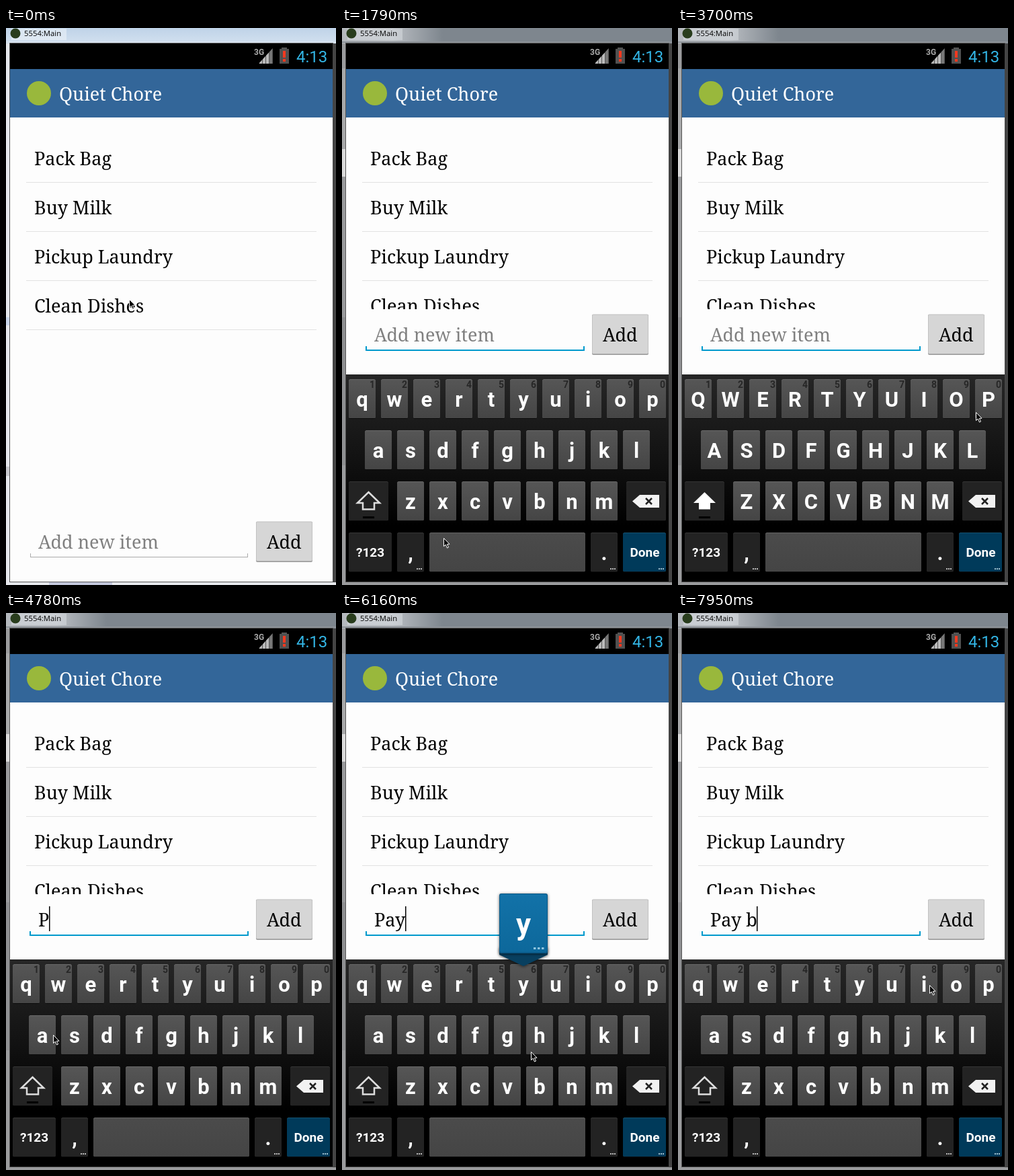
An HTML page with a canvas that plays this animation: 491x828 px, repeating every 8000 ms.

```html
<!DOCTYPE html>
<html lang="en">
<head>
<meta charset="utf-8">
<title>Task list</title>
<style>
html, body { margin: 0; width: 100%; height: 100%; overflow: hidden; background: #fff; }
canvas { display: block; width: 491px; height: 828px; }
</style>
</head>
<body>
<canvas id="stage"></canvas>
<script>
const LOOP = 8000, W = 491, H = 828;
const SERIF = '27px "Noto Serif", serif';
const canvas = document.getElementById('stage');
const dpr = window.devicePixelRatio || 1;
canvas.width = W * dpr;
canvas.height = H * dpr;
const c = canvas.getContext('2d');
c.scale(dpr, dpr);

// Moments of change, in ms
const ACTIVE = 930, FOCUS = 1210, KEYBOARD = 1640, SHIFT_ON = 3280, SHIFT_OFF = 4410;
const typed = [[4410, 'P'], [5240, 'Pa'], [6160, 'Pay'], [6850, 'Pay '], [7530, 'Pay b']];
const blinks = [FOCUS, 2200, 4410, 5240, 6160, 6850, 7530];
// start, end, letter, key centre, row top, has more dots
const popups = [
  [4410, 4540, 'P', 447, 522, true],
  [5240, 5500, 'a', 54, 598, true],
  [6160, 6300, 'y', 270, 522, true],
  [7530, 7660, 'b', 294, 674, false]
];
// Pointer way points: time, x, y
const path = [
  [20, 183, 403], [670, 151, 758], [2100, 151, 758], [2620, 39, 702], [2750, 39, 702],
  [3140, 300, 640], [3660, 443, 571], [3790, 443, 571], [4050, 460, 556], [4310, 460, 556],
  [4700, 70, 627], [4960, 60, 627], [5090, 60, 627], [5350, 150, 586], [5740, 262, 553],
  [5870, 262, 553], [6130, 281, 652], [6260, 281, 652], [6520, 306, 768], [6780, 306, 768],
  [7170, 297, 712], [7300, 297, 712], [7820, 374, 553]
];

function rect(x, y, w, h, fill) {
  c.fillStyle = fill;
  c.fillRect(x, y, w, h);
}

function round(x, y, w, h, r, fill) {
  c.beginPath();
  c.roundRect(x, y, w, h, r);
  c.fillStyle = fill;
  c.fill();
}

function disc(x, y, r, fill) {
  c.beginPath();
  c.arc(x, y, r, 0, Math.PI * 2);
  c.fillStyle = fill;
  c.fill();
}

function poly(fill, ...p) {
  c.beginPath();
  for (let i = 0; i < p.length; i += 2) c.lineTo(p[i], p[i + 1]);
  c.closePath();
  if (fill) {
    c.fillStyle = fill;
    c.fill();
  }
}

function text(s, x, y, font, fill, align = 'left') {
  c.font = font;
  c.fillStyle = fill;
  c.textAlign = align;
  c.fillText(s, x, y);
}

const bold = size => `bold ${size}px Roboto, sans-serif`;

function fade(x0, y0, x1, y1, ...colors) {
  const g = c.createLinearGradient(x0, y0, x1, y1);
  colors.forEach((col, i) => g.addColorStop(i / (colors.length - 1), col));
  return g;
}

function dots(x, y, fill = '#bbb') {
  for (let i = 0; i < 3; i++) rect(x + i * 3, y, 2, 2, fill);
}

function drawWindow(active) {
  rect(0, 0, W, H, active ? '#9a9b9d' : '#e6e8ec');
  rect(0, 0, W, 23, active
    ? fade(0, 0, 150, 0, '#b4b8bd', '#b9bdc2', '#7e868e')
    : fade(0, 0, 0, 23, '#bfd3e8', '#d2e0ef'));
  rect(8, 1, 82, 17, active ? 'rgba(225,228,232,.45)' : 'rgba(238,244,250,.55)');
  rect(0, 20, W, 2, active ? '#8d9298' : '#d9e4ef');
  if (active) {
    rect(0, 60, 5, 120, '#a8a9aa');
    rect(0, 180, 5, 41, '#dcdcdc');
    rect(0, 430, 5, 220, '#8f9092');
  } else {
    rect(0, 430, 5, 12, '#c9d6ea');
    rect(0, 652, 5, 14, '#c8c9ce');
    rect(64, 824, 94, 4, '#c3c7dc');
  }
  disc(14, 8, 7.5, '#293d1d');
  text('5554:Main', 27, 12, '11.3px "Open Sans", sans-serif', '#000');
  rect(5, 22, 482, 802, '#555');
  rect(486, 23, 5, 801, '#444');
  rect(6, 23, 480, 800, '#fdfdfd');
}

function drawHeader() {
  rect(6, 23, 480, 38, '#000');
  text('3G', 369, 39.5, bold(12), '#aaa');
  poly('#555', 376, 53, 397, 53, 397, 30);
  c.save();
  c.clip();
  for (let i = 0; i < 4; i++) rect(377 + i * 5, 29, 4, 24, i < 3 ? '#bbb' : '#777');
  c.restore();
  rect(410, 29, 8, 3, '#555');
  rect(407, 31, 14, 22, '#505050');
  rect(412, 34, 4, 10, '#f4391f');
  rect(412, 46, 4, 4, '#f4391f');
  text('4:13', 432, 51, '24px Roboto, sans-serif', '#33b5e5');
  rect(6, 61, 480, 72, '#336699');
  disc(49, 97, 18, '#99b83c');
  text('Quiet Chore', 79, 108, SERIF, '#fff');
}

function drawList(bottom) {
  c.save();
  c.beginPath();
  c.rect(6, 133, 480, bottom - 133);
  c.clip();
  ['Pack Bag', 'Buy Milk', 'Pickup Laundry', 'Clean Dishes'].forEach((item, i) => {
    text(item, 42, 204 + i * 73, SERIF, '#000');
    rect(30, 229 + i * 73, 432, 1, '#e2e2e2');
  });
  c.restore();
}

function drawForm(t) {
  c.save();
  if (t >= KEYBOARD) c.translate(0, -308);
  const focused = t >= FOCUS;
  const value = typed.reduce((s, [at, v]) => t >= at ? v : s, '');
  text(value || 'Add new item', 48, 774, SERIF, value ? '#000' : '#808080');
  if (focused) {
    rect(35, 786, 326, 2, '#0099cc');
    rect(35, 781, 2, 6, '#0099cc');
    rect(359, 781, 2, 6, '#0099cc');
    const since = t - blinks.filter(b => b <= t).pop();
    if (since % 1000 < 500) {
      c.font = SERIF;
      rect(Math.round(47.5 + c.measureText(value).width), 744, 1.5, 37, '#000');
    }
  } else {
    rect(36, 786, 324, 1, '#aaa');
    rect(36, 781, 1, 6, '#aaa');
    rect(359, 781, 1, 6, '#aaa');
  }
  round(372, 734, 84, 60, 2, '#9c9c9c');
  round(372, 733.5, 84, 59, 2, '#c2c2c2');
  round(373, 734.5, 82, 57.5, 1, '#d6d6d6');
  text('Add', 388, 774, SERIF, '#000');
  c.restore();
}

function key(x, y, w, top, base) {
  round(x, y, w, 59, 2.5, '#0a0a0a');
  round(x, y, w, 58, 2.5, top);
  round(x, y + 1, w, 57, 2.5, base);
}

function letterRow(letters, x0, y, upper, hints) {
  [...letters].forEach((ch, i) => {
    const x = x0 + i * 48;
    key(x, y, 40, '#686868', fade(0, y, 0, y + 58, '#565656', '#454545'));
    if (hints) text((i + 1) % 10, x + 35, y + 13, bold(14), '#272727', 'center');
    text(upper ? ch.toUpperCase() : ch, x + 20, y + 41, bold(31), '#fff', 'center');
  });
}

function darkKey(x, y, w) {
  key(x, y, w, '#363636', '#232323');
}

function drawKeyboard(upper) {
  rect(6, 515, 480, 308, fade(0, 515, 0, 740, '#262626', '#141414', '#000'));
  letterRow('qwertyuiop', 10, 522, upper, true);
  letterRow('asdfghjkl', 34, 598, upper);
  letterRow('zxcvbnm', 82, 674, upper);

  darkKey(10, 674, 59);
  poly(upper ? '#fff' : null, 39.5, 690, 56, 706, 48, 706, 48, 715.5, 31, 715.5, 31, 706, 23, 706);
  if (!upper) {
    c.strokeStyle = '#ddd';
    c.lineWidth = 2.5;
    c.stroke();
  }
  rect(31, 726, 17, 3, '#000');

  darkKey(423, 674, 59);
  poly('#f2f2f2', 432, 703.5, 443, 694, 472, 694, 472, 713, 443, 713);
  c.strokeStyle = '#222';
  c.lineWidth = 2.5;
  c.beginPath();
  c.moveTo(452, 699);
  c.lineTo(461, 708);
  c.moveTo(461, 699);
  c.lineTo(452, 708);
  c.stroke();

  darkKey(10, 750, 64);
  text('?123', 42, 786, bold(19), '#fff', 'center');
  darkKey(82, 750, 40);
  text(',', 102, 791, bold(31), '#fff', 'center');
  dots(111, 803);
  key(130, 750, 232, '#636363', fade(0, 750, 0, 808, '#4b4b4b', '#454545'));
  darkKey(370, 750, 40);
  text('.', 390, 791, bold(31), '#fff', 'center');
  dots(399, 803);
  key(418, 750, 64, '#15506f', '#003a5a');
  text('Done', 450.5, 786, bold(19), '#fff', 'center');
  dots(471, 803, '#9fc0d0');
}

function drawPopup(ch, x, row, more) {
  const y = row - 105;
  c.save();
  c.shadowColor = 'rgba(0,0,0,.6)';
  c.shadowBlur = 4;
  c.shadowOffsetY = 1;
  poly('#083f5f', x - 36, y + 80, x + 36, y + 80, x + 36, y + 91, x, y + 108, x - 36, y + 91);
  round(x - 36, y, 72, 89, 3, '#0b5a88');
  c.restore();
  round(x - 35, y + 1, 70, 86, 3, fade(0, y, 0, y + 88, '#1272a8', '#0d689b'));
  text(ch, x, y + 61, bold(44), '#fff', 'center');
  if (more) for (let i = 0; i < 3; i++) rect(x + 15 + i * 6, y + 80, 3.5, 3, '#8fc4de');
}

function pointerAt(t) {
  // The pointer is refreshed in steps of 130 ms.
  const s = Math.max(20, Math.floor((t - 20) / 130) * 130 + 20);
  const i = path.findIndex(p => p[0] > s);
  if (i < 0) return path[path.length - 1].slice(1);
  const [t0, x0, y0] = path[i - 1], [t1, x1, y1] = path[i];
  const u = (s - t0) / (t1 - t0), k = u * u * (3 - 2 * u);
  return [Math.round(x0 + (x1 - x0) * k), Math.round(y0 + (y1 - y0) * k)];
}

function drawPointer([x, y]) {
  c.save();
  c.translate(x, y);
  poly('#000', 0.5, 0.5, 0.5, 12.5, 3.2, 10, 5.5, 15, 7.5, 14, 5.3, 9.3, 9, 9.2);
  c.strokeStyle = '#fff';
  c.lineWidth = 1;
  c.stroke();
  c.restore();
}

function draw(t) {
  const open = t >= KEYBOARD;
  drawWindow(t >= ACTIVE);
  drawHeader();
  drawList(open ? 418 : 726);
  drawForm(t);
  if (open) drawKeyboard(t >= SHIFT_ON && t < SHIFT_OFF);
  for (const [from, to, ...popup] of popups) {
    if (t >= from && t < to) drawPopup(...popup);
  }
  drawPointer(pointerAt(t));
}

const start = performance.now();
function frame() {
  draw((performance.now() - start) % LOOP);
  requestAnimationFrame(frame);
}
frame();
</script>
</body>
</html>
```
